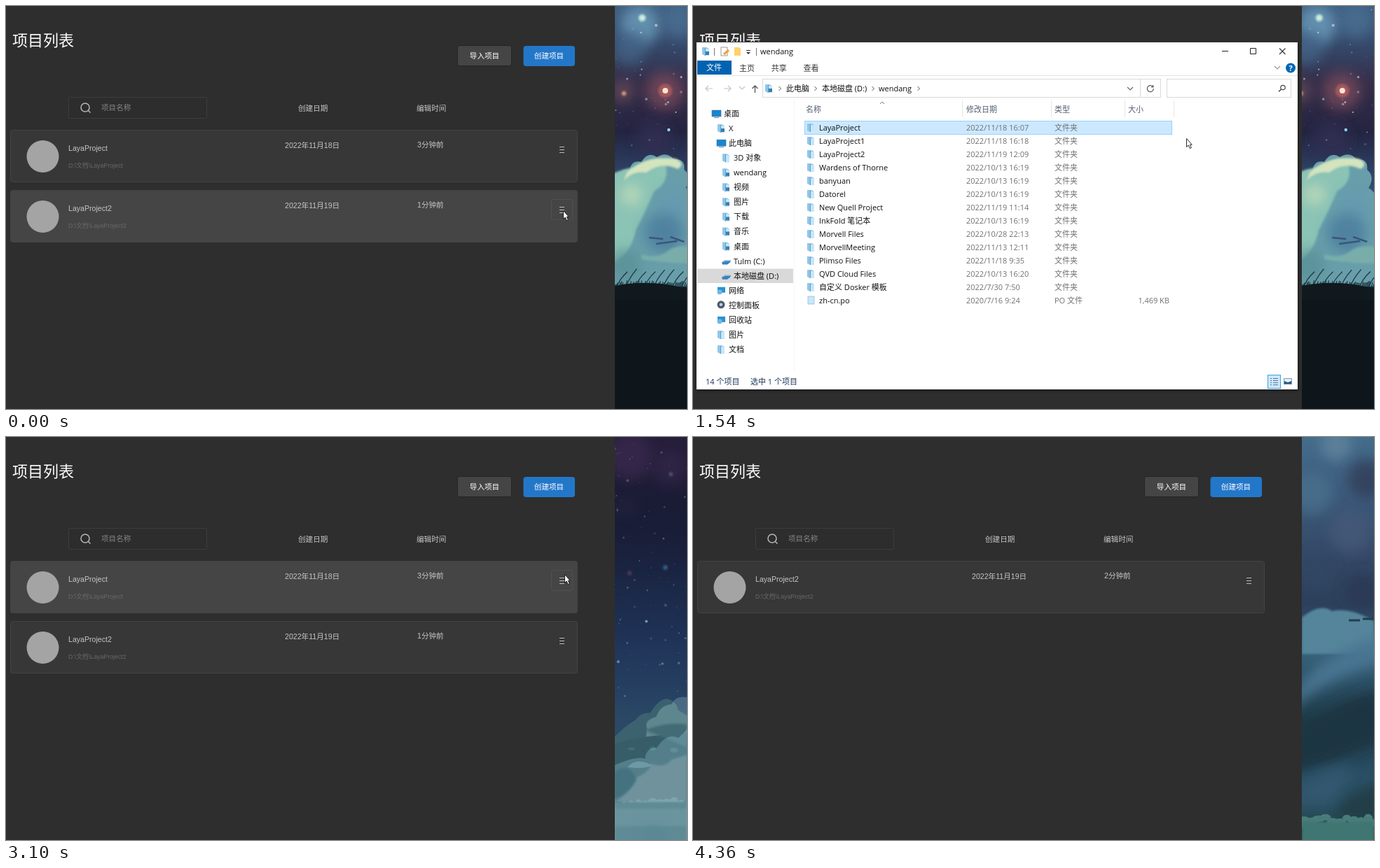
Animation of 972 by 576 pixels, one loop 4460 ms. Source, as an HTML page:

```html
<!DOCTYPE html>
<html lang="zh-CN">
<head>
<meta charset="utf-8">
<title>项目列表</title>
<style>
html, body { margin: 0; width: 100%; height: 100%; overflow: hidden; background: #2e2e2e; }
svg { display: block; }
text { white-space: pre; }
.app { font: 10.6px "Liberation Sans", "Noto Sans CJK SC", "Noto Sans CJK", sans-serif; }
.win { font: 11px "Open Sans", "Noto Sans CJK SC", "Noto Sans CJK", sans-serif; }
</style>
</head>
<body>
<svg id="stage" width="972" height="576" viewBox="0 0 972 576"></svg>
<script>
const LOOP = 4460;
const stage = document.getElementById('stage');

// Markup helpers
const text = (x, y, s, fill, extra = '') => `<text x="${x}" y="${y}" fill="${fill}" ${extra}>${s}</text>`;
const rect = (x, y, w, h, fill, extra = '') => `<rect x="${x}" y="${y}" width="${w}" height="${h}" fill="${fill}" ${extra}/>`;
const circle = (x, y, r, fill, extra = '') => `<circle cx="${x}" cy="${y}" r="${r}" fill="${fill}" ${extra}/>`;
const line = (d, stroke, width = 1) => `<path d="${d}" fill="none" stroke="${stroke}" stroke-width="${width}"/>`;
const shape = (d, fill, extra = '') => `<path d="${d}" fill="${fill}" ${extra}/>`;
const group = (id, body, extra = '') => `<g id="${id}" ${extra}>${body}</g>`;
const gradient = (id, stops) => `<linearGradient id="${id}" x1="0" y1="0" x2="0" y2="1">${
  stops.map(([at, color]) => `<stop offset="${at / 576}" stop-color="${color}"/>`).join('')}</linearGradient>`;
const middle = 'text-anchor="middle"';
const soft = 'filter="url(#soft)"';
const haze = 'filter="url(#haze)"';

function random(seed) {
  return () => (seed = seed * 16807 % 2147483647) / 2147483647;
}

// Wallpaper
function stars(seed, count, bottom) {
  const rnd = random(seed);
  return Array.from({ length: count }, () => circle(
    (866 + rnd() * 130).toFixed(1), (rnd() * bottom).toFixed(1), (0.4 + rnd() ** 4 * 1.8).toFixed(2),
    rnd() < 0.4 ? '#7fa9c8' : '#c3cede', `opacity="${(0.25 + rnd() * 0.6).toFixed(2)}"`)).join('');
}

function puffs(seed, y, slope, size, fill, count = 12) {
  const rnd = random(seed);
  return Array.from({ length: count }, (_, i) => {
    const x = 862 + i * 122 / count;
    return `<ellipse cx="${x}" cy="${(y + slope * (x - 869) + rnd() * size).toFixed(1)}" rx="${
      (size * (0.6 + rnd() * 0.6)).toFixed(1)}" ry="${(size * (0.4 + rnd() * 0.5)).toFixed(1)}" fill="${fill}"/>`;
  }).join('');
}

const glow = (x, y, r, color, opacity) => circle(x, y, r, color, `opacity="${opacity}" ${haze}`);
const sky = id => rect(869, 0, 103, 576, `url(#${id})`);

function grass() {
  const rnd = random(31);
  return Array.from({ length: 60 }, (_, i) => {
    const x = 866 + i * 1.9, tall = i % 7 === 3 ? 22 : 5;
    return line(`M${x} 403q2 ${-tall / 2} ${(tall * 0.7).toFixed(1)} ${(-tall - rnd() * 6).toFixed(1)}`, '#1a303b', 1.2);
  }).join('');
}

const meadow = sky('skyMeadow') + group('nebula',
  glow(905, 28, 28, '#75a9c6', 0.7) + glow(890, 60, 24, '#426486', 0.8) + glow(960, 22, 24, '#4b7396', 0.7) +
  glow(940, 122, 27, '#87505e', 0.65) + glow(880, 122, 16, '#79545f', 0.6) + glow(925, 190, 25, '#332e53', 0.8) +
  stars(73, 80, 205) + circle(908, 17, 5, '#c9edde', soft) +
  circle(941, 121, 10, '#cf6b62', `opacity=".55" ${soft}`) + circle(941, 121, 4, '#ffe4cf') +
  circle(882, 125, 3, '#e0a184', soft) + circle(946, 177, 2.2, '#8ed2f3')) +
  group('meadowCloud',
    shape('M840 410V250Q866 241 875 246Q877 232 890 234Q893 219 907 223Q916 207 929 216Q943 207 953 219Q970 218 968 234Q980 244 970 260Q988 270 980 300L1000 325V410Z', '#689eaa') +
    shape('M840 410V254Q882 228 900 232Q925 212 940 222Q950 250 925 265Q910 300 899 320Q890 365 850 372Z', '#8bc3b5', soft) +
    shape('M886 238Q911 213 955 218Q971 225 959 233Q935 222 914 238Q895 235 882 249Z', '#d3e4be', soft) +
    glow(893, 270, 15, '#c1dcb9', 0.8) + glow(950, 284, 22, '#659ab2', 0.7) + glow(939, 324, 28, '#44779c', 0.7) +
    glow(885, 371, 23, '#5a9196', 0.8) + shape('M907 355Q930 362 945 350T990 347V368Q940 368 907 362Z', '#78adaa', soft) +
    line('M918 331l20 2m-10 7l30-4m-10-6l20 7', '#3b5578', 2.5)) +
  rect(869, 401, 103, 175, '#0e161b') + grass() +
  shape('M869 400Q920 390 972 404V420H869Z', '#10191e');

const night = sky('skyNight') + group('nightStars',
  stars(17, 95, 400) + circle(914, 275, 2, '#b4d5eb') + circle(941, 198, 3.2, '#4389b8', soft) +
  circle(890, 206, 3, '#754d63', soft) + glow(885, 110, 14, '#3c334d', 0.4)) +
  group('nightCloud',
    shape('M869 464Q884 449 899 440Q905 430 920 430Q930 412 943 410Q958 414 959 426L972 434V700H869Z', '#426d75') +
    shape('M869 505Q900 491 912 496Q914 479 929 480Q943 458 960 466L972 454V700H869Z', '#71a4ae') +
    shape('M869 558Q900 536 893 525Q917 518 921 503Q940 510 950 497L972 490V700H869Z', '#a1c6cf', soft) +
    shape('M869 515Q890 499 900 526Q890 545 869 553Z', '#58919b', soft) + rect(869, 558, 103, 100, '#68949f', soft));

const dusk = sky('skyDusk') + group('duskStars',
  glow(890, 18, 33, '#673d74', 0.75) + glow(948, 34, 25, '#593867', 0.7) + stars(97, 85, 345) +
  circle(949, 43, 2.6, '#a9bee0', soft) + circle(937, 314, 1.8, '#bad3df')) +
  group('duskCloud',
    shape('M915 386Q910 374 928 369Q934 352 950 351Q955 338 972 341V420H910Z', '#86aab5') +
    shape('M869 407Q890 401 910 398T972 392V540H869Z', '#284957') +
    shape('M912 388Q945 375 972 380V413Q940 398 912 388Z', '#426a79', soft) +
    puffs(5, 413, 0, 5, '#426f7d', 4) + shape('M887 441Q899 426 922 438Q913 444 887 441Z', '#668b98') +
    puffs(37, 488, 0, 7, '#4c7783') + rect(869, 493, 103, 220, '#517f8a') +
    rect(869, 500, 103, 25, '#6e969d', soft) + glow(925, 544, 20, '#42727d', 0.6));

const deep = sky('skyDeep') + group('deepStars',
  circle(924, -10, 17, '#584746', soft) + stars(51, 125, 295) +
  circle(949, 214, 3, '#7fb4d7', soft) + circle(881, 157, 2, '#a7d2e3')) +
  group('deepCloud',
    shape('M869 283Q890 278 894 304Q908 306 917 316Q937 310 943 307Q959 300 972 306V700H869Z', '#31546d') +
    shape('M909 318Q933 312 938 308Q960 299 972 306V319Q941 325 909 318Z', '#54798f', soft) +
    glow(905, 352, 27, '#25475f', 0.7) + rect(860, 373, 120, 45, '#253e51', haze) +
    shape('M869 440Q890 439 903 442Q920 428 936 434Q960 421 972 431V700H869Z', '#52798d') +
    rect(864, 448, 115, 42, '#5d8ca2', haze) + puffs(21, 508, 0, 10, '#6e9ca9') +
    shape('M882 541Q881 526 904 526Q919 524 922 542ZM930 525Q950 505 972 509V530Z', '#9cb9bd', soft) +
    rect(869, 546, 103, 190, '#356c70', soft));

const storm = sky('skyStorm') + group('stormCloud',
  glow(918, 12, 22, '#6688a2', 0.7) + glow(883, 80, 30, '#4a6f8d', 0.8) + glow(962, 60, 28, '#303c58', 0.8) +
  glow(938, 135, 30, '#465a79', 0.7) + glow(890, 191, 25, '#334764', 0.8) + glow(955, 220, 25, '#293852', 0.8) +
  shape('M869 258Q895 237 912 249Q937 243 972 263V310H869Z', '#54859b', soft) +
  line('M936 262h16m4-2h15', '#233c4f', 3) +
  shape('M850 376Q900 300 990 285V322Q910 340 850 390Z', '#4a7592', haze) +
  shape('M850 430Q920 370 990 360V430Q910 470 850 480Z', '#1b3542', haze) +
  shape('M850 510Q910 465 940 472L919 527H850Z', '#31566e', haze) +
  shape('M920 530Q950 500 990 490V550H920Z', '#213e47', haze) +
  puffs(41, 543, 0, 9, '#487c78') + rect(869, 550, 103, 60, '#3f7672', soft));

const scenes = { meadow, night, dusk, deep, storm };
const cuts = { meadow: 0, night: 2400, dusk: 3040, deep: 3700, storm: 4130 };

// Project list
function projectRow(id, y, name, date, edited) {
  return group(id,
    rect(6.5, 177.5, 809, 74, '#373737', 'class="card" rx="3" stroke="#434343"') +
    rect(778.5, 190.5, 30, 29, 'none', 'class="button" rx="2" stroke="#505050"') +
    circle(52.5, 215, 23, '#a4a4a4') + text(89, 206.5, name, '#c5c5c5') +
    text(89, 231, `D:\\文档\\${name}`, '#686868', 'style="font-size:8.8px"') +
    text(398, 203, date, '#c5c5c5') + text(587, 202, edited, '#c5c5c5') +
    line('M790 201.5h7m-7 4h7m-7 4h7', '#bdbdbd'),
    `transform="translate(0 ${y})"`);
}

const app = rect(0, 0, 869, 576, '#2e2e2e') + `<g class="app">` +
  text(9, 57, '项目列表', '#fff', 'style="font-size:22px"') +
  rect(644.5, 56.5, 77, 29, '#454545', 'rx="3" stroke="#242424"') + text(683, 74.5, '导入项目', '#fff', middle) +
  rect(738.5, 57, 73.5, 29, '#2377c9', 'rx="4"') + text(775, 74.5, '创建项目', '#fff', middle) +
  rect(89.5, 130.5, 197, 30, '#2d2d2d', 'rx="1" stroke="#3d3d3d"') +
  circle(113, 145, 6, 'none', 'stroke="#b8b8b8" stroke-width="1.5"') + line('M117.5 149.5l3 3', '#b8b8b8', 1.5) +
  text(136, 148.5, '项目名称', '#858585') + text(417, 150, '创建日期', '#c5c5c5') + text(586, 150, '编辑时间', '#c5c5c5') +
  projectRow('first', 0, 'LayaProject', '2022年11月18日', '3分钟前') +
  projectRow('second', 86, 'LayaProject2', '2022年11月19日', '1分钟前') +
  projectRow('remaining', 0, 'LayaProject2', '2022年11月19日', '2分钟前') + '</g>';

// File browser
const folder = (x, y) => shape(`M${x - 5} ${y - 6}h6l4 2v10h-6l-4-2z`, '#8fc7ea') +
  shape(`M${x} ${y - 4}h5v10h-5z`, '#c9e6f7') + line(`M${x - 0.5} ${y - 5}v11`, '#5b9fcb');
const monitor = (x, y) => rect(x - 6, y - 5, 13, 9, '#1687d2', 'stroke="#4c6d87" stroke-width=".6"') + line(`M${x - 3} ${y + 5.5}h7`, '#75899a');
const disk = (x, y) => shape(`M${x - 6} ${y + 2}l4-3h9l-1 3-4 3h-7z`, '#3683c2') + line(`M${x - 5} ${y + 1.5}l4-2h7`, '#b7cad7');
const disc = (x, y) => circle(x, y - 1, 5.5, '#4e5963') + circle(x, y - 1, 2.3, '#aed5ec');
const globe = (x, y) => rect(x - 5, y - 5, 11, 8, '#2b91d1') + circle(x - 2, y + 2, 3.5, '#70b8df');
const marked = (x, y) => folder(x, y) + rect(x, y, 5, 5, '#3c7eab');

const places = [
  [44, '桌面', monitor], [51, 'X', marked], [51, '此电脑', monitor], [58, '3D 对象', folder],
  [58, 'wendang', marked], [58, '视频', marked], [58, '图片', marked], [58, '下载', marked],
  [58, '音乐', marked], [58, '桌面', marked], [58, 'Tulm (C:)', disk], [58, '本地磁盘 (D:)', disk],
  [51, '网络', globe], [51, '控制面板', disc], [51, '回收站', globe], [51, '图片', folder], [51, '文档', folder]
];

const files = [
  ['LayaProject', '2022/11/18 16:07'], ['LayaProject1', '2022/11/18 16:18'], ['LayaProject2', '2022/11/19 12:09'],
  ['Wardens of Thorne', '2022/10/13 16:19'], ['banyuan', '2022/10/13 16:19'], ['Datorel', '2022/10/13 16:19'],
  ['New Quell Project', '2022/11/19 11:14'], ['InkFold 笔记本', '2022/10/13 16:19'], ['Morvell Files', '2022/10/28 22:13'],
  ['MorvellMeeting', '2022/11/13 12:11'], ['Plimso Files', '2022/11/18 9:35'], ['QVD Cloud Files', '2022/10/13 16:20'],
  ['自定义 Dosker 模板', '2022/7/30 7:50'], ['zh-cn.po', '2020/7/16 9:24', 'PO 文件', '1,469 KB']
];

const placeList = places.map(([x, name, icon], i) => {
  const y = 154 + i * 21.06;
  return icon(x - 11, y) + text(x, y + 4, name, '#111');
}).join('');

const fileList = files.map(([name, date, type = '文件夹', size = ''], i) => {
  const y = 174 + i * 19;
  const icon = size ? rect(164, y - 6, 9, 11, '#c9e7f8', 'stroke="#86b9d5" stroke-width=".7"') : folder(168, y);
  return icon + text(180, y + 4, name, '#111') + text(390, y + 4, date, '#707070') +
    text(516, y + 4, type, '#707070') + text(680, y + 4, size, '#707070', 'text-anchor="end"');
}).join('');

const chevron = (x, y = 118) => line(`M${x - 1.5} ${y - 3}l3 3-3 3`, '#555');
const expand = (x, y, color = '#666') => line(`M${x - 4} ${y - 2}l4 4 4-4`, color, 1.2);

const titleBar = marked(18, 65) + line('M30.5 60v11M90.5 60v11', '#777') +
  rect(40, 59, 9, 12, '#fff', 'stroke="#999"') + line('M44 69l7-6', '#eda13a', 3) +
  shape('M59 59h6l3 2v10h-9z', '#ffd16b') + line('M76 63.5h6', '#333') + shape('M76 66h6l-3 3z', '#333') +
  text(96, 69, 'wendang', '#111') + line('M755 64.5h9', '#222') + line('M795.5 60.5h8v8h-8z', '#222') +
  rect(822, 52, 41, 25, '#e81123', 'id="closeHot"') + line('M837 60.5l8.5 8.5m0-8.5l-8.5 8.5', '#333', 1.1).replace('<path', '<path id="closeMark"');

const ribbon = rect(6, 78, 49, 20, '#0063b1') + text(30, 92, '文件', '#fff', middle) +
  ['主页', '共享', '查看'].map((s, i) => text(77 + i * 45.7, 93, s, '#333', middle)).join('') +
  line('M6 99.5h857', '#e2e2e2') + expand(834, 88, '#999') + circle(853, 88.5, 7, '#0067b8') +
  text(853, 92.5, '?', '#fff', `${middle} font-weight="bold"`);

const addressBar = line('M28 118H18m4-4l-4 4 4 4M44 118h10m-4-4l4 4-4 4', '#c4c4c4', 1.2) + expand(70, 117, '#c4c4c4') +
  line('M88.5 124v-10m-4 4l4-4 4 4', '#555', 1.3) + rect(99.5, 104.5, 568, 26, '#fff', 'stroke="#d9d9d9"') +
  line('M638.5 105v25', '#d9d9d9') + marked(108, 118) + [124, 175, 257, 322].map(x => chevron(x)).join('') +
  text(133, 122, '此电脑', '#111') + text(184, 122, '本地磁盘 (D:)', '#111') + text(265, 122, 'wendang', '#111') +
  expand(624, 118) + line('M656 115a4.5 4.5 0 1 0 1.3 3m-.5-5v3h-3', '#555', 1.2) +
  rect(676.5, 104.5, 177, 26, '#fff', 'stroke="#d9d9d9"') + circle(842, 116.5, 3.2, 'none', 'stroke="#444" stroke-width="1.2"') +
  line('M839.5 119l-3.5 3.5', '#444', 1.5);

const columns = [[161, '名称'], [390, '修改日期'], [516, '类型'], [621, '大小']]
  .map(([x, s]) => text(x, 152, s, '#535f70')).join('') +
  line('M384.5 135v24M511.5 135v24M616.5 135v24M686.5 135v24', '#e5e5e5') + line('M267 140l3-3 3 3', '#777');

const statusBar = text(18, 541, '14 个项目', '#1e395b') + text(82, 541, '选中 1 个项目', '#1e395b') +
  rect(820.5, 527.5, 18, 19, '#cce8ff', 'stroke="#3ba3dc"') +
  line('M824 532.5h2m2 0h7m-11 3h2m2 0h7m-11 3h2m2 0h7m-11 3h2m2 0h7', '#60758a') +
  rect(843.5, 532.5, 11, 8, '#e6f1f7', 'stroke="#879aa6"') + shape('M844 540v-4l5 2 5-2v4z', '#245a83');

const browser = group('browser',
  rect(5, 51, 858, 497, '#fff', 'filter="url(#shadow)"') + line('M5 51.5h858', '#3d3d3d') +
  titleBar + ribbon + addressBar + columns +
  rect(6, 375.5, 137, 20.5, '#d9d9d9') + line('M144.5 133v390', '#f5f5f5') + placeList +
  rect(159.5, 164.5, 524, 19, '#cce8ff', 'stroke="#99d1ff"') + fileList + statusBar, 'class="win"');

const menu = group('menu',
  rect(0, 0, 154, 50, '#fdfdfd', 'filter="url(#shadow)"') + rect(0, 0, 154, 21, '#e6e6e6', 'id="menuHot"') +
  text(22, 18, 'Reveal in File Explorer', '#222') + text(22, 39, 'Remove from list', '#222'),
  'class="win" style="font-size:10.7px"');

const cursor = group('cursor', shape('M.5 .5V12.5L3.2 10 5.2 14.5 7.3 13.6 5.3 9.2H8.2Z', '#fff', 'stroke="#111" stroke-width=".9"'));

stage.innerHTML = `<defs>
  <clipPath id="view"><rect x="869" y="0" width="103" height="576"/></clipPath>
  <filter id="soft" x="-50%" y="-50%" width="200%" height="200%"><feGaussianBlur stdDeviation="1.8"/></filter>
  <filter id="haze" x="-100%" y="-100%" width="300%" height="300%"><feGaussianBlur stdDeviation="9"/></filter>
  <filter id="shadow" x="-10%" y="-20%" width="120%" height="150%"><feDropShadow dx="1" dy="2" stdDeviation="2" flood-opacity=".45"/></filter>
  ${gradient('skyMeadow', [[0, '#405f80'], [55, '#35496b'], [110, '#352e49'], [180, '#242441'], [250, '#30486c'], [400, '#437399']])}
  ${gradient('skyNight', [[0, '#1b1b34'], [130, '#191d36'], [260, '#1b2b4e'], [370, '#203a61'], [450, '#294967']])}
  ${gradient('skyDusk', [[0, '#382546'], [90, '#1b1a33'], [180, '#1a2441'], [300, '#263d60'], [400, '#355469']])}
  ${gradient('skyDeep', [[0, '#1a1b30'], [150, '#1b1c34'], [240, '#1c2841'], [330, '#2b4862']])}
  ${gradient('skyStorm', [[0, '#446d8b'], [80, '#3d5b7c'], [170, '#354866'], [240, '#2c405b'], [310, '#36617b'], [410, '#1d3946'], [490, '#2b5167'], [576, '#24464e']])}
</defs><g clip-path="url(#view)">${Object.entries(scenes).map(([id, body]) => group(id, body)).join('')}</g>` +
  app + browser + menu + cursor;

const parts = Object.fromEntries([...stage.querySelectorAll('[id]')].map(el => [el.id, el]));
const show = (el, on) => { el.style.display = on ? '' : 'none'; };
const move = (el, x, y) => el.setAttribute('transform', `translate(${x.toFixed(2)} ${y.toFixed(2)})`);
const within = (t, from, to) => t >= from && t < to;

const pointerPath = [
  [0, 795, 292], [160, 795, 292], [460, 790, 213], [760, 790, 213], [1010, 847, 228], [1450, 847, 228],
  [1470, 704, 189], [1550, 704, 189], [1620, 750, 164], [1700, 792, 134], [1780, 815, 110], [1860, 838, 72],
  [2320, 838, 72], [2480, 835, 114], [2850, 835, 114], [2930, 824, 147], [3020, 797, 196], [3350, 797, 196],
  [3480, 829, 238], [LOOP, 829, 238]
];

function pointerAt(t) {
  const i = pointerPath.findIndex(key => key[0] > t);
  const [t0, x0, y0] = pointerPath[i - 1], [t1, x1, y1] = pointerPath[i];
  const k = (t - t0) / (t1 - t0);
  return [x0 + (x1 - x0) * k, y0 + (y1 - y0) * k];
}

function paintWallpaper(t) {
  const ids = Object.keys(cuts);
  ids.forEach((id, i) => {
    const age = t - cuts[id];
    parts[id].style.opacity = i ? Math.min(1, Math.max(0, age / 150)) : 1;
    show(parts[id], age >= 0 && !(t > cuts[ids[i + 1]] + 150));
  });
  move(parts.nebula, -t * 0.0092, 0);
  move(parts.meadowCloud, -t * 0.0038, 0);
  [['night', 2640], ['dusk', 3500], ['deep', 3960]].forEach(([id, rest]) => {
    move(parts[id + 'Stars'], 0, (rest - t) * 0.025);
    move(parts[id + 'Cloud'], 0, (rest - t) * 0.078);
  });
  move(parts.stormCloud, 0, (4360 - t) * 0.05);
}

function render(t) {
  const [x, y] = pointerAt(t);
  const firstMenu = within(t, 620, 1170), secondMenu = within(t, 3330, 3820);
  const menuOpen = firstMenu || secondMenu;
  const browserOpen = within(t, 1470, 2320);
  const removed = t >= 3880;
  paintWallpaper(t);

  const inRow = top => !browserOpen && x < 816 && y > top && y < top + 75;
  const hovered = { first: menuOpen || inRow(177), second: !menuOpen && inRow(263), remaining: false };
  for (const [id, on] of Object.entries(hovered)) {
    parts[id].querySelector('.card').setAttribute('fill', on ? '#454545' : '#373737');
    show(parts[id].querySelector('.button'), on && x > 778);
    show(parts[id], (id === 'remaining') === removed);
  }

  show(parts.browser, browserOpen);
  const onClose = x > 822 && y < 77;
  show(parts.closeHot, onClose);
  parts.closeMark.setAttribute('stroke', onClose ? '#fff' : '#333');

  const [menuX, menuY] = firstMenu ? [790, 213] : [797, 196];
  show(parts.menu, menuOpen);
  move(parts.menu, menuX, menuY);
  const item = y - menuY > 25 ? 1 : 0;
  show(parts.menuHot, x > menuX + 1);
  parts.menuHot.setAttribute('y', 4 + item * 21);

  show(parts.cursor, t < 4280);
  move(parts.cursor, x, y);
}

const start = performance.now();
function tick() {
  render((performance.now() - start) % LOOP);
  requestAnimationFrame(tick);
}
tick();
</script>
</body>
</html>
```
